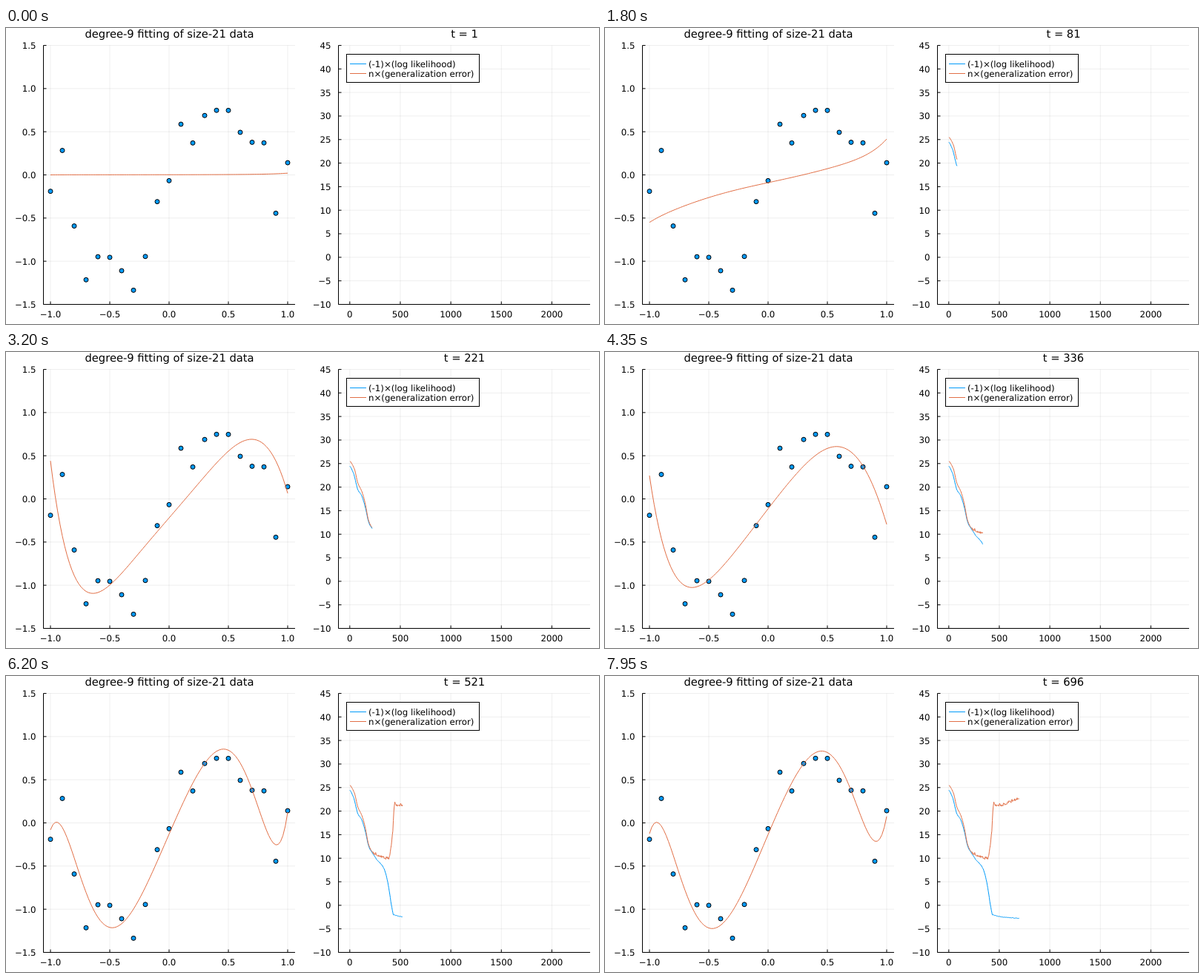
An HTML page for the animation above (8000 ms loop, 800 by 400 pixels).

```html
<!DOCTYPE html>
<html lang="en">
<head>
<meta charset="utf-8">
<title>Polynomial fitting</title>
<style>
  html, body { margin: 0; width: 100%; height: 100%; overflow: hidden; background: #fff; }
  svg { display: block; width: 800px; height: 400px; }
  text { font: 11.75px "DejaVu Sans", sans-serif; fill: #000; text-rendering: geometricPrecision; }
  .title { font-size: 14.7px; text-anchor: middle; }
  .mid { text-anchor: middle; }
  .end { text-anchor: end; }
  path, line { fill: none; stroke-width: 1; stroke-linejoin: round; }
  .grid { stroke: #000; stroke-opacity: .065; }
  .axis { stroke: #000; }
  .blue { stroke: #009afa; }
  .red { stroke: #e26f46; }
  circle { fill: #009afa; stroke: #000; stroke-width: 1; }
</style>
</head>
<body>
<svg viewBox="0 0 800 400">
  <g id="frame"></g>
  <text class="title" x="220.5" y="13">degree-9 fitting of size-21 data</text>
  <text class="title" x="618.5" y="13" id="counter">t = 1</text>
  <g id="dots"></g>
  <path class="red" id="fit"/>
  <path class="blue" id="loss"/>
  <path class="red" id="error"/>
  <rect x="459.5" y="35.5" width="179" height="38" fill="#fff" stroke="#000"/>
  <line class="blue" x1="464" x2="486" y1="48.5" y2="48.5"/>
  <line class="red" x1="464" x2="486" y1="61.5" y2="61.5"/>
  <text x="489" y="52.8">(-1)×(log likelihood)</text>
  <text x="489" y="65.8">n×(generalization error)</text>
</svg>
<script>
const $ = id => document.getElementById(id);

function add(parent, tag, attrs, label) {
  const el = document.createElementNS('http://www.w3.org/2000/svg', tag);
  for (const key in attrs) el.setAttribute(key, attrs[key]);
  if (label !== undefined) el.textContent = label;
  parent.appendChild(el);
}
const seg = (cls, x1, y1, x2, y2) => add($('frame'), 'line', { class: cls, x1, y1, x2, y2 });
const range = (from, to, step) =>
  Array.from({ length: Math.round((to - from) / step) + 1 }, (_, i) => from + i * step);
const toPath = pts => 'M' + pts.map(p => p[0].toFixed(2) + ' ' + p[1].toFixed(2)).join('L');

const TOP = 23.5, BOTTOM = 373.5, HEIGHT = BOTTOM - TOP;
const left = { x0: 50.5, x1: 390, X: x => 220 + 160 * x, Y: y => TOP + (1.5 - y) * HEIGHT / 3 };
const right = { x0: 448.5, x1: 788, X: t => 463.8 + t * 0.1363, Y: v => TOP + (45 - v) * HEIGHT / 55 };

function drawAxes(p, xs, ys, digits) {
  const name = v => v.toFixed(digits).replace('-', '\u2212');
  xs.forEach(v => seg('grid', p.X(v), TOP, p.X(v), BOTTOM));
  ys.forEach(v => seg('grid', p.x0, p.Y(v), p.x1, p.Y(v)));
  seg('axis', p.x0, BOTTOM, p.x1, BOTTOM);
  seg('axis', p.x0, TOP, p.x0, BOTTOM);
  xs.forEach(v => {
    seg('axis', p.X(v), BOTTOM, p.X(v), BOTTOM - 4);
    add($('frame'), 'text', { class: 'mid', x: p.X(v), y: 391.3 }, name(v));
  });
  ys.forEach(v => {
    seg('axis', p.x0, p.Y(v), p.x0 + 4, p.Y(v));
    add($('frame'), 'text', { class: 'end', x: p.x0 - 10, y: p.Y(v) + 4.4 }, name(v));
  });
}
drawAxes(left, range(-1, 1, 0.5), range(-1.5, 1.5, 0.5), 1);
drawAxes(right, range(0, 2000, 500), range(-10, 45, 5), 0);

// Measured data, evenly spaced on [-1, 1]
const samples = [-.19, .283, -.592, -1.215, -.948, -.955, -1.11, -1.336, -.945, -.31, -.067,
  .587, .37, .688, .748, .747, .493, .378, .371, -.444, .141];
samples.forEach((y, i) => add($('dots'), 'circle', { cx: left.X(-1 + i / 10), cy: left.Y(y), r: 3 }));

// Shape-preserving cubic through the points [t, v]
function spline(pts) {
  const n = pts.length;
  const h = [], d = [], m = [];
  for (let i = 0; i < n - 1; i++) {
    h[i] = pts[i + 1][0] - pts[i][0];
    d[i] = (pts[i + 1][1] - pts[i][1]) / h[i];
  }
  m[0] = d[0] / 2;
  m[n - 1] = d[n - 2];
  for (let i = 1; i < n - 1; i++) {
    const a = 2 * h[i] + h[i - 1], b = h[i] + 2 * h[i - 1];
    m[i] = d[i - 1] * d[i] <= 0 ? 0 : (a + b) / (a / d[i - 1] + b / d[i]);
  }
  return t => {
    let i = 0;
    while (i < n - 2 && t > pts[i + 1][0]) i++;
    const s = (t - pts[i][0]) / h[i], r = 1 - s;
    return r * r * (1 + 2 * s) * pts[i][1] + s * s * (3 - 2 * s) * pts[i + 1][1]
      + h[i] * s * r * (r * m[i] - s * m[i + 1]);
  };
}

// The fitted polynomial is given by its values at Chebyshev nodes.
// It starts with equal small coefficients, swings up, then settles on the data.
const nodes = range(0, 8, 1).map(k => -Math.cos(k * Math.PI / 8));
const start = nodes.map(x => range(0, 9, 1).reduce((sum, k) => sum + 0.002 * x ** k, 0));
const rise = [-.55, -.49, -.36, -.215, -.09, .03, .16, .318, .415];
const poses = [
  [1, start],
  [81, rise],
  [102, rise.map(v => v * 1.35)],
  [221, [.44, -.265, -1.065, -.835, -.22, .39, .69, .369, .065]],
  [336, [.27, -.319, -1, -.78, -.115, .485, .535, .019, -.295]],
  [421, [.135, 0, -.885, -1.015, -.13, .735, .38, -.16, .02]],
  [460, [-.045, -.01, -.8, -1.13, -.13, .815, .36, -.25, .13]],
  [696, [-.125, 0, -.755, -1.165, -.135, .8, .35, -.21, .075]]
];
const tracks = nodes.map((_, k) => spline(poses.map(([t, values]) => [t, values[k]])));

function evalPoly(values, x) {
  let num = 0, den = 0;
  for (let k = 0; k < 9; k++) {
    const gap = x - nodes[k];
    if (Math.abs(gap) < 1e-9) return values[k];
    const w = (k % 2 ? -1 : 1) * (k % 8 ? 1 : 0.5) / gap;
    num += w * values[k];
    den += w;
  }
  return num / den;
}

const lossAt = spline([[1, 24.4], [40, 22.7], [81, 19.4], [117, 18.2], [150, 16], [190, 12.4],
  [221, 11.2], [265, 9.8], [336, 7.9], [373, 5.2], [421, -1], [432, -2], [696, -2.8]]);
const errorAt = spline([[1, 25.5], [45, 23.9], [81, 20.8], [117, 19.2], [150, 16.8], [185, 13],
  [221, 11.4], [386, 10], [421, 14.6], [446, 21.8], [460, 21.2], [696, 22.7]]);

function jitter(n) {
  const r = Math.sin(n * 12.9898) * 43758.5453;
  return (r - Math.floor(r)) * 2 - 1;
}
const steps = range(1, 696, 5);
const lossPts = steps.map(t => [right.X(t), right.Y(lossAt(t) + jitter(t) * 0.07)]);
const errorPts = steps.map(t =>
  [right.X(t), right.Y(errorAt(t) + jitter(t + 7) * (t > 221 ? 0.35 : 0.04))]);
const xs = range(-1, 1, 0.02);

let shown = -1;
function draw(now) {
  requestAnimationFrame(draw);
  const step = Math.max(0, Math.floor((now % 8000 - 1000) / 50));
  if (step === shown) return;
  shown = step;
  const t = 1 + 5 * step;
  const values = tracks.map(f => f(t));
  $('counter').textContent = 't = ' + t;
  $('fit').setAttribute('d', toPath(xs.map(x => [left.X(x), left.Y(evalPoly(values, x))])));
  $('loss').setAttribute('d', step ? toPath(lossPts.slice(0, step + 1)) : '');
  $('error').setAttribute('d', step ? toPath(errorPts.slice(0, step + 1)) : '');
}
draw(performance.now());
</script>
</body>
</html>
```
